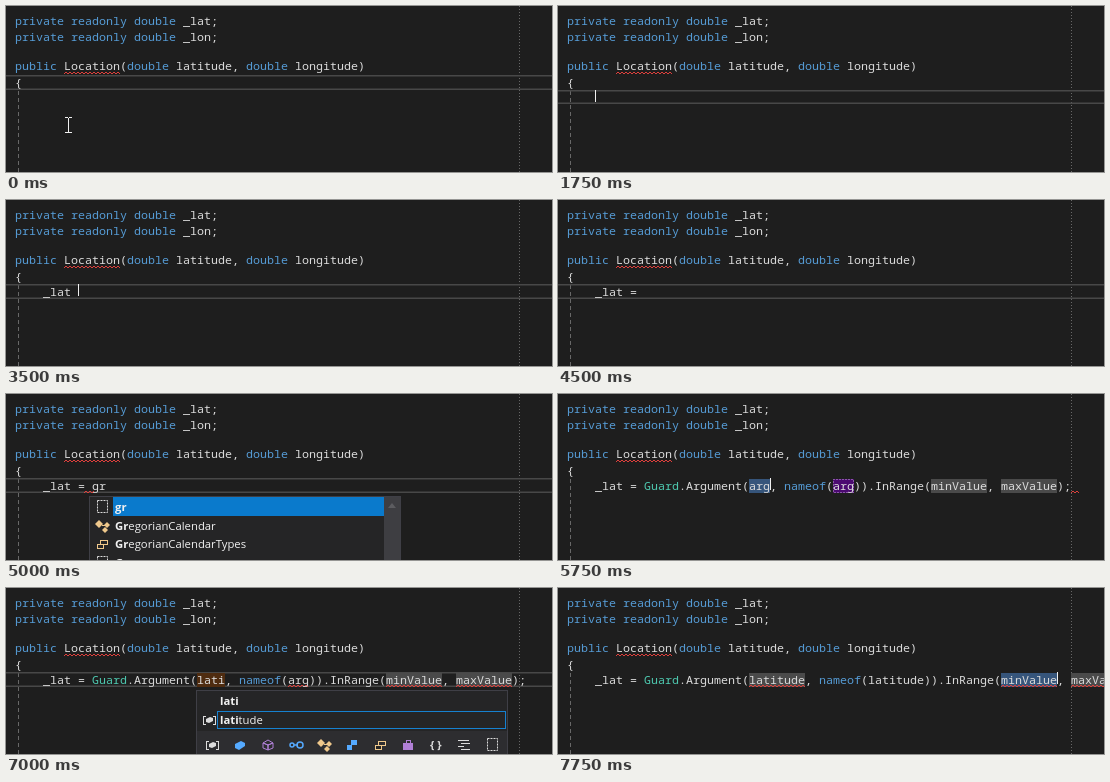
An HTML page with a canvas that plays this animation: 546 px wide and 166 px high, repeating every 8 s.

```html
<!DOCTYPE html>
<html lang="en">
<head>
<meta charset="utf-8">
<title>Typing a guard snippet</title>
<style>
html, body { margin: 0; width: 546px; height: 166px; overflow: hidden; background: #1e1e1e; }
canvas { display: block; }
</style>
</head>
<body>
<canvas id="stage" width="546" height="166"></canvas>
<script>
const ctx = document.getElementById('stage').getContext('2d');
const LOOP = 8000, CHAR = 7, LEFT = 9, INDENT = 37, BASE = 96;
const CODE = '11.67px "Noto Sans Mono", "DejaVu Sans Mono", monospace';
const UI = '11.3px "Open Sans", "Noto Sans", sans-serif';
const WHITE = '#dcdcdc', BLUE = '#569cd6', TEAL = '#4ec9b0', RED = '#e0403c';
const GRAY = '#4a4a4a', SELECT = '#36557b', PURPLE = '#4b0a70', BROWN = '#4f2c10';
const GOLD = '#efc88b', SKY = '#55aaff', VIOLET = '#b180d7', PANEL = '#252526';

const call = (value, name = 'arg') =>
  `_lat = Guard.Argument(${value}, nameof(${name})).InRange(minValue, maxValue);`;

// mark: [word, background, squiggle, last occurrence]
const fields = (bad = false) => [['minValue', GRAY, bad], ['maxValue', GRAY, bad]];
const picked = [['arg', SELECT], ['arg', PURPLE, false, true], ...fields()];

const fieldList = typed => ({
  x: 34, w: 208, bar: true, typed, selected: 0,
  rows: [['_lat', 'field'], ['_lon', 'field']]
});
const grList = typed => ({
  x: 83, w: 312, scroll: true, typed, selected: 0,
  rows: [[typed, 'snippet'], ['GregorianCalendar', 'class'],
    ['GregorianCalendarTypes', 'enum'], ['Group', 'snippet']]
});
const latList = typed => ({
  x: 190, w: 312, bar: true, typed, outlined: 1,
  rows: [[typed], ['latitude', 'local']]
});

const typingAssign = (text, caret = text.length) => ({ text, caret });
const typingArg = value => ({
  text: call(value), popup: latList(value),
  marks: [[value, BROWN], ['arg', null, true, true], ...fields(true)]
});

const steps = [
  [0, { brace: true, mouse: true }],
  [250, { brace: true, mouse: true, caret: 1 }],
  [750, { caret: 0 }],
  [1250, {}],
  [1750, { caret: 0 }],
  [2250, { ...typingAssign('_'), popup: fieldList('_') }],
  [2500, { ...typingAssign('_l'), popup: fieldList('_l') }],
  [2750, { ...typingAssign('_la'), popup: fieldList('_la') }],
  [3000, { ...typingAssign('_lat'), popup: fieldList('_lat') }],
  [3250, typingAssign('_lat')],
  [3500, typingAssign('_lat ')],
  [3750, typingAssign('_lat =')],
  [4000, typingAssign('_lat = ')],
  [4500, { text: '_lat = ' }],
  [4750, { ...typingAssign('_lat = g'), popup: grList('g') }],
  [5000, { text: '_lat = gr', popup: grList('gr'), wave: [78, 88] }],
  [5500, { text: '_lat = gr', wave: [78, 88] }],
  [5750, { text: call('arg'), marks: picked, caret: 25, noLine: true, wave: [513, 522] }],
  [6000, { text: call('arg'), marks: picked, noLine: true, wave: [513, 522] }],
  [6250, typingArg('l')],
  [6500, typingArg('la')],
  [6750, typingArg('lat')],
  [7000, typingArg('lati')],
  [7500, {
    text: call('latitude'), caret: 30,
    marks: [['latitude', BROWN], ['arg', null, true, true], ...fields(true)]
  }],
  [7750, {
    text: call('latitude', 'latitude'), caret: 66, noLine: true,
    marks: [['latitude', GRAY, true], ['minValue', SELECT, true], ['maxValue', GRAY, true]]
  }]
];

function rect(x, y, w, h, color) {
  ctx.fillStyle = color;
  ctx.fillRect(x, y, w, h);
}

function outline(x, y, w, h, color) {
  ctx.strokeStyle = color;
  ctx.strokeRect(x + .5, y + .5, w - 1, h - 1);
}

function shape(points, color, fill) {
  ctx.beginPath();
  points.forEach(([x, y]) => ctx.lineTo(x, y));
  ctx.closePath();
  ctx.fillStyle = ctx.strokeStyle = color;
  fill ? ctx.fill() : ctx.stroke();
}

function codeLine(text, x, y) {
  ctx.font = CODE;
  for (const token of text.matchAll(/\w+|[^\w\s]+/g)) {
    const word = token[0];
    ctx.fillStyle = /^(private|readonly|double|public|nameof)$/.test(word) ? BLUE
      : word === 'Guard' ? TEAL : WHITE;
    ctx.fillText(word, x + token.index * CHAR, y);
  }
}

function squiggle(from, to, y) {
  ctx.strokeStyle = RED;
  ctx.beginPath();
  for (let x = from, i = 0; x <= to; x += 2, i++) ctx.lineTo(x, y + (i % 2 ? -1 : 1));
  ctx.stroke();
}

function dashes(x, y, on, gap, color) {
  for (; y < 166; y += on + gap) rect(x, y, 1, on, color);
}

function cube(x, y, color, fill) {
  shape([[x, y - 5], [x + 5, y - 2], [x + 5, y + 3], [x, y + 5], [x - 5, y + 3], [x - 5, y - 2]], color, fill);
}

const icons = {
  snippet(x, y) {
    ctx.setLineDash([2, 1]);
    outline(x - 5, y - 7, 11, 13, WHITE);
    ctx.setLineDash([]);
  },
  class(x, y) {
    shape([[x - 3, y - 6], [x + 1, y - 2], [x - 3, y + 2], [x - 7, y - 2]], GOLD, true);
    rect(x, y - 1, 4, 1, GOLD);
    for (const [a, b] of [[5, -1], [3, 4]])
      shape([[x + a, y + b - 3], [x + a + 3, y + b], [x + a, y + b + 3], [x + a - 3, y + b]], GOLD, true);
  },
  enum(x, y) {
    outline(x - 2, y - 4, 8, 5, GOLD);
    rect(x - 5, y, 7, 5, PANEL);
    outline(x - 5, y, 7, 5, GOLD);
  },
  field(x, y) {
    shape([[x - 5, y - 1], [x + 1, y - 4], [x + 5, y - 2], [x + 5, y + 1], [x - 1, y + 5], [x - 5, y + 3]], SKY, true);
  },
  method(x, y) {
    cube(x, y, VIOLET);
    shape([[x - 5, y - 2], [x, y], [x + 5, y - 2], [x, y], [x, y + 5], [x, y]], VIOLET);
  },
  link(x, y) {
    ctx.strokeStyle = SKY;
    ctx.lineWidth = 1.5;
    ctx.beginPath();
    ctx.arc(x - 4, y, 2, 0, 7);
    ctx.moveTo(x - 2, y);
    ctx.lineTo(x + 2, y);
    ctx.moveTo(x + 7, y);
    ctx.arc(x + 4, y, 3, 0, 7);
    ctx.stroke();
    ctx.lineWidth = 1;
  },
  struct(x, y) {
    rect(x - 1, y - 5, 6, 5, SKY);
    rect(x - 5, y, 5, 5, SKY);
  },
  delegate(x, y) {
    rect(x - 5, y - 2, 10, 7, VIOLET);
    outline(x - 2, y - 5, 5, 4, VIOLET);
  },
  braces(x, y) {
    ctx.font = 'bold 11px "Open Sans", sans-serif';
    ctx.fillStyle = WHITE;
    ctx.fillText('{ }', x - 6, y + 4);
  },
  lines(x, y) {
    [[-6, 11], [-3, 9], [-6, 6], [-3, 9]].forEach(([a, w], i) => rect(x + a, y - 5 + i * 3, w, 1, WHITE));
  },
  local(x, y) {
    for (const side of [-1, 1]) {
      rect(x + side * 6, y - 4, 1, 9, WHITE);
      rect(x + (side < 0 ? -6 : 4), y - 4, 3, 1, WHITE);
      rect(x + (side < 0 ? -6 : 4), y + 4, 3, 1, WHITE);
    }
    shape([[x - 3, y - 1], [x + 1, y - 3], [x + 4, y - 2], [x + 4, y + 1], [x, y + 3], [x - 3, y + 2]], WHITE, true);
  }
};

const filters = ['local', 'field', 'method', 'link', 'class', 'struct', 'enum', 'delegate', 'braces', 'lines', 'snippet'];

function listRow(popup, [label, icon], i) {
  const { x, w, typed } = popup, top = 103 + Math.round(i * 18.7);
  const right = x + w - (popup.scroll ? 17 : 2);
  if (popup.selected === i) rect(x + 24, top, right - x - 24, 19, '#0a7acc');
  if (popup.outlined === i) outline(x + 21, top + 1, right - x - 21, 18, '#1681d0');
  if (icon) icons[icon](x + 13, top + 10);
  ctx.fillStyle = '#f1f1f1';
  const hit = label.toLowerCase().startsWith(typed) ? typed.length : 0;
  const textX = x + (popup.outlined ? 24 : 26);
  ctx.font = 'bold ' + UI;
  ctx.fillText(label.slice(0, hit), textX, top + 14);
  const boldWidth = ctx.measureText(label.slice(0, hit)).width;
  ctx.font = UI;
  ctx.fillText(label.slice(hit), textX + boldWidth, top + 14);
}

function drawPopup(popup) {
  const { x, w } = popup;
  rect(x, 102, w, 64, '#3f3f46');
  rect(x + 1, 103, w - 2, 63, PANEL);
  popup.rows.forEach((row, i) => listRow(popup, row, i));
  if (popup.scroll) {
    rect(x + w - 17, 103, 16, 63, '#3e3e42');
    shape([[x + w - 9, 109], [x + w - 5, 114], [x + w - 13, 114]], '#5c5c60', true);
  }
  if (popup.bar) {
    rect(x + 1, 143, w - 2, 23, '#2d2d30');
    filters.forEach((name, i) => {
      const cx = x + 16 + i * 28;
      if (cx < x + w - 8) icons[name](cx, 157);
    });
  }
}

function drawMarks(text, marks) {
  for (const [word, color, bad, last] of marks) {
    // The word stands between brackets, spaces or commas.
    const at = last ? text.lastIndexOf(word + ')') : text.search(new RegExp(`[( ]${word}[,)]`)) + 1;
    const x = INDENT + at * CHAR, w = word.length * CHAR;
    if (color) rect(x, 85, w, 14, color);
    if (color === PURPLE) {
      ctx.setLineDash([1, 2]);
      outline(x, 85, w, 14, '#c9a6dc');
      ctx.setLineDash([]);
    }
    if (bad) squiggle(x, x + w, 98);
  }
}

function drawMouse(x, y) {
  rect(x, y - 7, 1, 15, '#f0f0f0');
  for (const end of [-8, 7]) {
    rect(x - 3, y + end, 3, 1, '#f0f0f0');
    rect(x + 1, y + end, 3, 1, '#f0f0f0');
  }
}

function draw(state) {
  const { text = '', marks = [], caret, brace, popup, wave } = state;
  rect(0, 0, 546, 166, '#1e1e1e');
  dashes(513, 0, 1, 2, '#686868');
  dashes(12, 85, 4, 3, '#686868');
  if (!state.noLine) {
    const top = brace ? 69 : 84, height = brace || text ? 13.5 : 12.5;
    rect(0, top, 546, 1.5, '#484848');
    rect(0, top + height, 546, 1.5, '#484848');
  }
  codeLine('private readonly double _lat;', LEFT, 19);
  codeLine('private readonly double _lon;', LEFT, 35);
  codeLine('public Location(double latitude, double longitude)', LEFT, 64);
  codeLine('{', LEFT, 81);
  squiggle(58, 114, 67);
  drawMarks(text, marks);
  codeLine(text, INDENT, BASE);
  if (wave) squiggle(...wave, 98);
  if (caret !== undefined) rect((brace ? LEFT : INDENT) + caret * CHAR, brace ? 70 : 84, 1, 12, '#f0f0f0');
  if (popup) drawPopup(popup);
  if (state.mouse) drawMouse(62, 119);
}

function tick() {
  const t = performance.now() % LOOP;
  draw(steps.filter(([start]) => start <= t).pop()[1]);
  requestAnimationFrame(tick);
}
tick();
</script>
</body>
</html>
```
